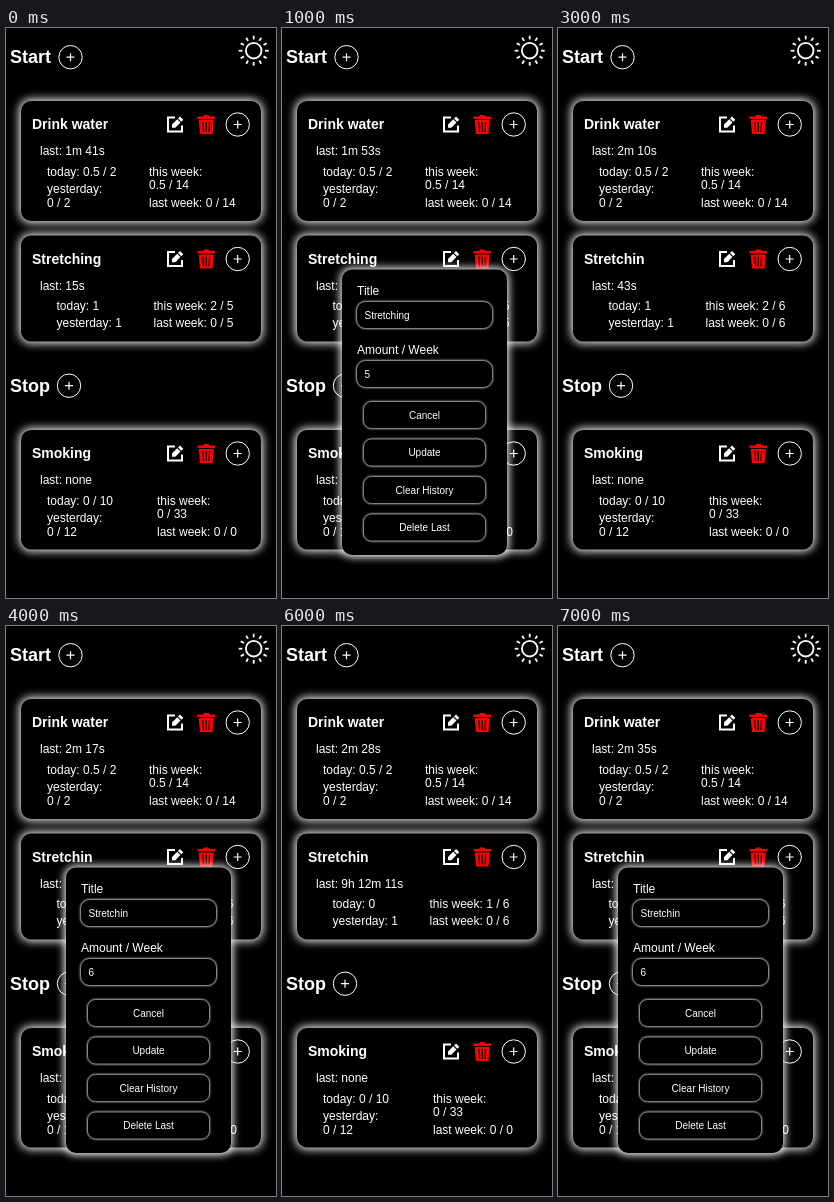
These frames come from a looping animation (270x570 px, 8000 ms). An HTML page:

```html
<!DOCTYPE html>
<html lang="en">
<head>
<meta charset="utf-8">
<title>Habit tracker</title>
<style>
  html, body { margin: 0; width: 100%; height: 100%; overflow: hidden; background: #000; }
  svg { display: block; width: 270px; height: 570px; font: 12px "Liberation Sans", Arial, sans-serif; fill: #fff; }
  text { white-space: pre; }
  .head { font-size: 18px; font-weight: bold; }
  .name { font-size: 14px; font-weight: bold; }
  .small { font-size: 10px; }
  .mid { text-anchor: middle; }
  .line { fill: none; stroke: #fff; }
  .glow { filter: blur(5px); }
  .modal .glow { filter: blur(4px); }
  .field { fill: #000; stroke: #858585; filter: drop-shadow(0 0 1px #999); }
  .focus { stroke: #fff; stroke-width: 1.3; }
</style>
</head>
<body>
<svg id="stage" viewBox="0 0 270 570"></svg>
<script>
const STEP = 1000;
// Seconds since each habit was last done, and what the dialog shows
const steps = [
  { water: 101, stretch: 15 },
  { water: 113, stretch: 27, modal: { title: 'Stretching', amount: 5 } },
  { water: 124, stretch: 38, modal: { title: 'Stretchin', amount: 6, focus: true } },
  { water: 130, stretch: 43, saved: true },
  { water: 137, stretch: 50, saved: true, modal: { title: 'Stretchin', amount: 6 } },
  { water: 144, stretch: 57, saved: true, modal: { title: 'Stretchin', amount: 6, hover: true } },
  { water: 148, stretch: 33131, saved: true, removed: true },
  { water: 155, stretch: 33138, saved: true, removed: true, modal: { title: 'Stretchin', amount: 6 } }
];

const text = (x, y, s, cls = '') => `<text x="${x}" y="${y}" class="${cls}">${s}</text>`;
const rect = (x, y, w, h, r, attrs = '') =>
  `<rect x="${x}" y="${y}" width="${w}" height="${h}" rx="${r}" ${attrs}/>`;

function duration(sec) {
  const h = Math.floor(sec / 3600), m = Math.floor(sec / 60) % 60;
  return (h ? h + 'h ' : '') + (sec >= 60 ? m + 'm ' : '') + sec % 60 + 's';
}

const panel = (x, y, w, h, r) =>
  rect(x - 1.5, y - 1.5, w + 3, h + 3, r + 1.5, 'class="glow"') + rect(x, y, w, h, r, 'fill="#000"');

const plus = (x, y) => `<g class="line" transform="translate(${x} ${y})">
  <circle r="11.7"/><path d="M-4 0H4M0 -4V4" stroke-width="1.2"/></g>`;

const edit = y => `<g transform="translate(161 ${y - 8})">
  <path class="line" stroke-width="2" d="M8 1H1V15H15V9"/>
  <path d="M5 8L10.2 2.8 13.5 6.1 8.3 11.3H5ZM11 2L13 0 16.3 3.3 14.3 5.3Z"/></g>`;

const trash = y => `<g transform="translate(191.5 ${y - 10})" fill="#f00">
  <path d="M0 2H5.5L6.5 0.5H11L12 2H17.5V4.5H0ZM1.2 5.5H16.3L15 19.5H2.5Z"/>
  <path stroke="#000" stroke-width="1.2" d="M5.4 7.5L6 17.5M8.8 7.5V17.5M12.1 7.5L11.5 17.5"/></g>`;

function sun(dim) {
  let rays = '';
  for (let a = 0; a < 360; a += 30) rays += `<path d="M0 -11.3V-15" transform="rotate(${a})"/>`;
  return `<g class="line" stroke-width="1.8" transform="translate(247.7 22.7)" opacity="${dim ? 0.8 : 1}">
    <circle r="7.8"/>${rays}</g>`;
}

const card = (y, h, name, last, rows) =>
  panel(15, y, 240, h, 10) + text(26, y + 28, name, 'name') + text(34, y + 54, 'last: ' + last) +
  edit(y + 23.5) + trash(y + 23.5) + plus(231.7, y + 23.5) +
  rows.map(([x, dy, s]) => text(x, y + dy, s)).join('');

// Rows for a narrow card, where long values wrap onto their own line
const wrapped = (x, today, yesterday, week, lastWeek) => [
  [41, 75, 'today: ' + today], [41, 92, 'yesterday:'], [41, 106, yesterday],
  [x, 75, 'this week:'], [x, 88, week], [x, 106, 'last week: ' + lastWeek]
];

function button(y, label, hover) {
  const scale = hover ? 1.1 : 1;
  return `<g transform="translate(142.5 ${y}) scale(${scale})">` +
    rect(-61, -13.5, 122, 27, 8, 'class="field"') + text(0, 3.5, label, 'small mid') + '</g>';
}

const input = (y, value, focus) =>
  rect(74.5, y, 136, 27, 9, `class="field ${focus ? 'focus' : ''}"`) + text(82.5, y + 17, value, 'small');

const spinner = `<path d="M88.5 340.5V350.5" class="line" stroke-width=".8"/>` +
  rect(191, 340, 11, 10, 0) +
  '<path fill="#000" d="M194 344L196.5 341.5 199 344ZM194 346L196.5 348.5 199 346Z"/>';

const dialog = ({ title, amount, focus, hover }) => '<g class="modal">' +
  panel(60, 241.5, 165, 285.5, 10) +
  text(75, 267, 'Title') + input(273.5, title) +
  text(75, 326, 'Amount / Week') + input(332.5, amount, focus) + (focus ? spinner : '') +
  button(387, 'Cancel') + button(424.5, 'Update') + button(462, 'Clear History') +
  button(499.5, 'Delete Last', hover) + '</g>';

function view({ water, stretch, saved, removed, modal }) {
  const goal = saved ? 6 : 5;
  return text(4, 35, 'Start', 'head') + plus(64.5, 29.2) + sun(modal && modal.hover) +
    card(73, 120, 'Drink water', duration(water), wrapped(143, '0.5 / 2', '0 / 2', '0.5 / 14', '0 / 14')) +
    card(207.5, 106, saved ? 'Stretchin' : 'Stretching', duration(stretch), [
      [50.5, 74.5, 'today: ' + (removed ? 0 : 1)], [50.5, 91.5, 'yesterday: 1'],
      [147.5, 74.5, `this week: ${removed ? 1 : 2} / ${goal}`], [147.5, 91.5, 'last week: 0 / ' + goal]
    ]) +
    text(4, 364, 'Stop', 'head') + plus(63, 357.7) +
    card(402, 119.5, 'Smoking', 'none', wrapped(151, '0 / 10', '0 / 12', '0 / 33', '0 / 0')) +
    (modal ? dialog(modal) : '');
}

const stage = document.getElementById('stage');
const start = performance.now();
let shown = -1;

function tick() {
  const i = Math.floor((performance.now() - start) / STEP) % steps.length;
  if (i !== shown) stage.innerHTML = view(steps[shown = i]);
  requestAnimationFrame(tick);
}
tick();
</script>
</body>
</html>
```
